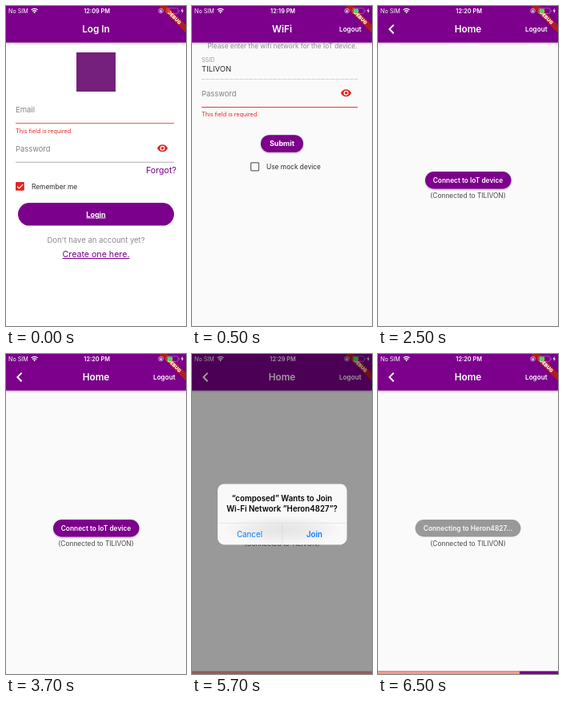
Recreate the animation shown at these times as an HTML page. Size 225 by 400 pixels, loop 8 s.

```html
<!DOCTYPE html>
<html lang="en">
<head>
<meta charset="utf-8">
<title>Device setup</title>
<style>
  html, body { margin: 0; width: 100%; height: 100%; overflow: hidden; background: #fafafa; }
  svg { display: block; width: 100%; height: 100%; }
  text { font-family: Inter, Roboto, sans-serif; white-space: pre; }
</style>
</head>
<body>
<svg id="stage" viewBox="0 0 225 400" xmlns="http://www.w3.org/2000/svg"></svg>
<script>
const PURPLE = '#7b008b', RED = '#e02626', PINK = '#ef9a90', GRAY = '#808080', INK = '#2b2b2b', BLUE = '#0a7cff';
const NETWORK = 'TILIVON', DEVICE = 'Heron4827', APP = 'composed';
const LOOP = 8000;

const text = (x, y, size, str, fill = INK, opts = '') =>
  `<text x="${x}" y="${y}" font-size="${size}" fill="${fill}" ${opts}>${str}</text>`;
const mid = (y, size, str, fill, opts = '', x = 112.5) =>
  text(x, y, size, str, fill, `text-anchor="middle" ${opts}`);
const rect = (x, y, w, h, fill, r = 0, opts = '') =>
  `<rect x="${x}" y="${y}" width="${w}" height="${h}" rx="${r}" fill="${fill}" ${opts}/>`;
const line = (x1, y1, x2, y2, stroke, width = 0.6, opts = '') =>
  `<path d="M${x1} ${y1}L${x2} ${y2}" stroke="${stroke}" stroke-width="${width}" ${opts}/>`;
const SEMI = 'font-weight="600"', BOLD = 'font-weight="700"';

const pill = (x, y, w, h, fill, shadow = true) =>
  rect(x, y, w, h, fill, h / 2, shadow ? 'filter="url(#lift)"' : '');

const eye = (x, y) => `<g transform="translate(${x} ${y}) scale(.6)">
  <path fill="${RED}" fill-rule="evenodd" d="M0-7.5C-5-7.5-9.3-4.4-11 0-9.3 4.4-5 7.5 0 7.5S9.3 4.4 11 0C9.3-4.4 5-7.5 0-7.5ZM0 5A5 5 0 1 1 0-5 5 5 0 0 1 0 5ZM0-3A3 3 0 1 0 0 3 3 3 0 0 0 0-3Z"/></g>`;

const wifi = `<g transform="translate(35.6 8.9)" fill="none" stroke="#fff" stroke-width="1.25">
  <path d="M-4-4A5.7 5.7 0 0 1 4-4M-2.5-2.3A3.5 3.5 0 0 1 2.5-2.3"/>
  <path d="M0 .3L-1.4-1.1A2 2 0 0 1 1.4-1.1Z" fill="#fff" stroke="none"/></g>`;

const statusIcons = (charge, level) => `
  <circle cx="193.6" cy="6" r="2.8" fill="none" stroke="#fff" stroke-width=".6"/>
  ${rect(192.4, 5.5, 2.4, 1.9, '#fff', 0.3)}
  <path d="M192.9 5.6V4.9a.7.7 0 0 1 1.4 0V5.6" fill="none" stroke="#fff" stroke-width=".4"/>
  ${rect(200.8, 2.8, 14.4, 6.6, 'none', 1.6, 'stroke="#fff" stroke-opacity=".5" stroke-width=".6"')}
  ${rect(201.8, 3.6, level, 5, charge, 0.8)}
  <path d="M216.2 5a1.2 1.2 0 0 1 0 2.2Z" fill="#fff" fill-opacity=".5"/>
  <path d="M220.8 2.6L218.6 6.5H220.2L219.6 9.4 221.9 5.4H220.3Z" fill="#fff"/>`;

const banner = `<g transform="translate(225 0) rotate(45)">
  ${rect(-24, 16.8, 48, 7.2, '#b71c1c', 0, 'fill-opacity=".9" filter="url(#soft)"')}
  ${mid(22.6, 6, 'DEBUG', '#fff', 'font-weight="900"', 0)}</g>`;

// The status icons sit above the ribbon.
function header(time, title, { back = false, logout = true, charge = '#4cd964', level = 6.4 } = {}) {
  return rect(-6, -6, 237, 51.6, PURPLE, 0, 'filter="url(#bar)"')
    + text(3, 8.7, 7.2, 'No SIM', '#fff') + wifi
    + mid(8.7, 7.3, time, '#fff', SEMI, 113.6)
    + (back ? '<path d="M19.6 23.6L14.4 28.9 19.6 34.2" fill="none" stroke="#fff" stroke-width="2"/>' : '')
    + mid(33.2, 11.8, title, '#fff', SEMI)
    + (logout ? text(184, 31.8, 8.2, 'Logout', '#fff', SEMI) : '')
    + banner + statusIcons(charge, level);
}

const error = y => text(12, y, 7.2, 'This field is required.', RED);
const connected = mid(240.2, 8.35, `(Connected to ${NETWORK})`, '#4a4a4a');
const connect = pill(59, 207, 107.5, 21.5, PURPLE)
  + mid(220.7, 8.35, 'Connect to IoT device', '#fff', SEMI);
const page = fill => rect(0, 0, 225, 400, fill);

const login = () =>
  page('#fff')
  + rect(88, 58, 49, 49, '#74207c')
  + text(12, 132.8, 9.5, 'Email', GRAY) + line(12, 146.6, 210, 146.6, RED, 0.8) + error(158.5)
  + text(12, 181.7, 9.4, 'Password', GRAY) + eye(195.6, 177.8)
  + line(12, 195.3, 210, 195.3, '#777')
  + text(213, 208.8, 10.7, 'Forgot?', PURPLE, 'text-anchor="end"')
  + rect(12, 220, 10.8, 10.8, RED, 1.2)
  + '<path d="M14 225.6L16.4 228 21 223.2" fill="none" stroke="#fff" stroke-width="1.2"/>'
  + text(32, 228.5, 8.35, 'Remember me')
  + pill(15, 246, 195, 28.6, PURPLE, false)
  + mid(263.5, 9, 'Login', '#fff', BOLD + ' text-decoration="underline"')
  + mid(295.9, 9.5, "Don't have an account yet?", '#8c8c8c')
  + mid(314, 10.65, 'Create one here.', PURPLE, 'text-decoration="underline"')
  + header('12:09 PM', 'Log In', { logout: false, charge: '#ff3b30', level: 3 });

const wifiForm = () =>
  mid(53.4, 8.3, 'Please enter the wifi network for the IoT device.', '#888', '', 113)
  + text(12, 70, 7.2, 'SSID', '#999') + text(12, 81.8, 9.5, NETWORK)
  + line(12, 91.5, 207, 91.5, '#888', 0.6, 'stroke-dasharray=".6 .6"')
  + text(12, 112.5, 9.4, 'Password', GRAY) + eye(192.6, 108.7)
  + line(12, 126.5, 207, 126.5, RED, 0.9) + error(138)
  + pill(86, 161.2, 53, 21.6, PURPLE) + mid(175.2, 9, 'Submit', '#fff', BOLD)
  + rect(73.6, 195.9, 9.9, 9.9, 'none', 0.7, 'stroke="#666" stroke-width="1.2"')
  + text(93, 203.9, 8.35, 'Use mock device')
  + header('12:19 PM', 'WiFi');

const home = () => connect + connected + header('12:20 PM', 'Home', { back: true });

const dialog = () =>
  connect + connected + rect(0, 396.4, 225, 3.6, PINK)
  + header('12:29 PM', 'Home', { back: true })
  + rect(0, 0, 225, 400, '#000', 0, 'fill-opacity=".39"')
  + rect(32, 162.5, 161.6, 75.7, '#f9f9f9', 8)
  + rect(38, 202, 149.6, 36.2, 'url(#haze)')
  + mid(183.9, 9.75, `“${APP}” Wants to Join`, '#000', SEMI)
  + mid(197.3, 9.75, `Wi-Fi Network ”${DEVICE}”?`, '#000', SEMI)
  + line(32, 211.4, 193.6, 211.4, '#cfcfd2', 0.5) + line(112.8, 211.4, 112.8, 238.2, '#cfcfd2', 0.5)
  + mid(228.8, 9.8, 'Cancel', BLUE, '', 72)
  + mid(228.8, 9.7, 'Join', BLUE, SEMI, 153);

const connecting = () =>
  pill(46.5, 207, 132, 21.5, '#999', false)
  + mid(220.7, 8.4, `Connecting to ${DEVICE}...`, '#f8f8f8', SEMI)
  + connected
  + rect(0, 396.4, 225, 3.6, PURPLE) + rect(0, 396.4, 177, 3.6, PINK)
  + header('12:20 PM', 'Home', { back: true });

const scenes = [[0, login], [500, wifiForm], [2500, home], [4500, dialog], [6500, connecting]];

const shadow = (id, dy, blur, alpha) =>
  `<filter id="${id}" x="-20%" y="-40%" width="140%" height="200%">
    <feDropShadow dx="0" dy="${dy}" stdDeviation="${blur}" flood-color="#000" flood-opacity="${alpha}"/></filter>`;
const haze = `<radialGradient id="haze">
  <stop offset="0" stop-color="#e6e4e6"/><stop offset=".5" stop-color="#ececec"/>
  <stop offset="1" stop-color="#f9f9f9"/></radialGradient>`;

const stage = document.getElementById('stage');
stage.innerHTML = `<defs>${shadow('bar', 1, 1.1, 0.3)}${shadow('lift', 0.9, 0.8, 0.35)}${shadow('soft', 0, 1, 0.4)}${haze}</defs>`
  + page('#fafafa')
  + scenes.map(([, draw]) => `<g class="scene" display="none">${draw()}</g>`).join('');
const groups = [...stage.querySelectorAll('.scene')];

function render(ms) {
  const t = ms % LOOP;
  const current = scenes.filter(([start]) => t >= start).length - 1;
  groups.forEach((g, i) => g.setAttribute('display', i === current ? 'inline' : 'none'));
}

const begin = performance.now();
function tick() {
  render(performance.now() - begin);
  requestAnimationFrame(tick);
}
tick();
</script>
</body>
</html>
```
